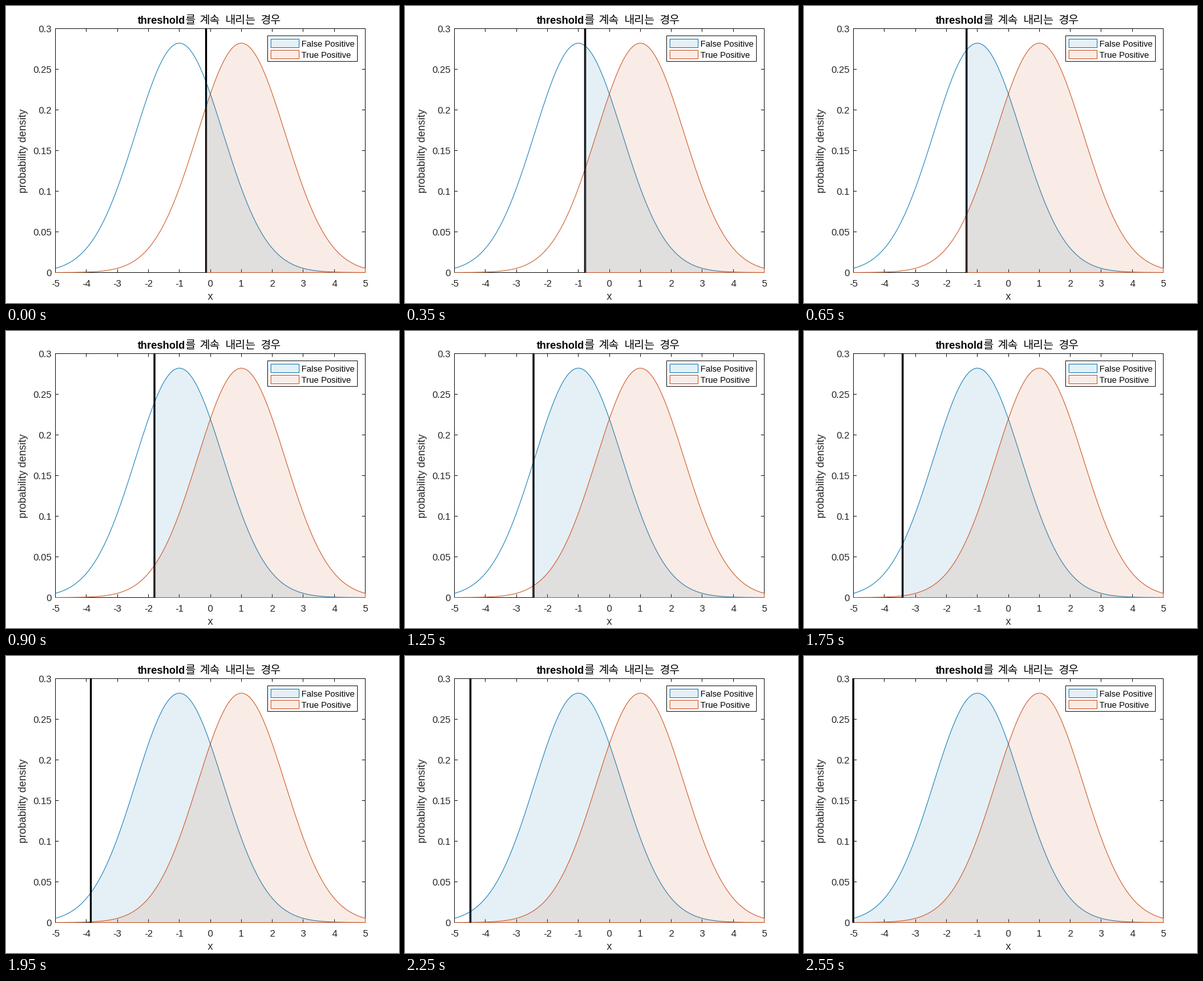
These frames come from a looping animation (600 px wide and 453 px high, 2850 ms). A matplotlib script:

```python
import numpy as np
import matplotlib.pyplot as plt
from matplotlib.animation import FuncAnimation
from matplotlib.patches import Rectangle

# Coordinates already lie on pixel centres, so keep them as given.
plt.rcParams["path.snap"] = False

W, H, DPI = 600, 453, 64
PT = 72 / DPI  # points per pixel
LEFT, RIGHT, TOP, BOTTOM = 75.5, 548.5, 34.5, 406.5
BLUE, ORANGE, DARK = "#1A80B8", "#CE5A28", "#262626"
FILL_ALPHA = 0.115
SANS, KOREAN = "Liberation Sans", "Noto Sans CJK JP"
STEP_MS, FRAMES = 50, 57

# Times at which the threshold pauses for one step, and where it passes.
PAUSES = {50, 450, 850, 1200, 1600, 2300}
KEY_TIMES = [0, 350, 900, 1250, 1500, 1950, 2550]
KEY_X = [305.5, 275, 226.7, 196.2, 171.7, 129.5, 75.2]


def px(x):
    return LEFT + (x + 5) * (RIGHT - LEFT) / 10


def py(p):
    return BOTTOM - p * (BOTTOM - TOP) / 0.3


def density(x, mean):
    return np.exp(-(x - mean) ** 2 / 4) / np.sqrt(4 * np.pi)


def moves(ms):
    """Number of threshold moves made up to a time."""
    return sum(t not in PAUSES for t in range(STEP_MS, min(ms, 2550) + 1, STEP_MS))


KEY_MOVES = [moves(t) for t in KEY_TIMES]


def threshold(frame):
    return np.interp(moves(frame * STEP_MS), KEY_MOVES, KEY_X)


fig = plt.figure(figsize=(W / DPI, H / DPI), dpi=DPI, facecolor="white")
ax = fig.add_axes([0, 0, 1, 1])
ax.set_xlim(0, W)
ax.set_ylim(H, 0)
ax.axis("off")


def line(xs, ys, color=DARK, width=1.0, z=2, **kw):
    return ax.plot(xs, ys, color=color, lw=width * PT, zorder=z,
                   solid_capstyle="butt", **kw)[0]


def label(x, y, s, size, ha="center", font=SANS, color=DARK, va="baseline", **kw):
    return ax.text(x, y, s, fontsize=size * PT, ha=ha, va=va, family=font,
                   color=color, zorder=12, **kw)


def box(x0, y0, x1, y1, z, **kw):
    ax.add_patch(Rectangle((x0, y0), x1 - x0, y1 - y0, lw=PT, zorder=z, **kw))


def draw_axes():
    box(LEFT, TOP, RIGHT, BOTTOM, 2, fc="none", ec=DARK)
    for v in range(-5, 6):
        x = round(px(v) - 0.5) + 0.5
        line([x, x], [BOTTOM, BOTTOM - 5])
        line([x, x], [TOP, TOP + 5])
        label(px(v), 428, str(v), 14.6)
    for k in range(7):
        y = py(0.05 * k)
        line([LEFT, LEFT + 5], [y, y])
        line([RIGHT, RIGHT - 5], [y, y])
        label(69.5, y + 5.5, f"{0.05 * k:.2g}", 14.6, ha="right")
    label(312, 448, "x", 16)
    label(27, 221, "probability density", 16, rotation=90, va="center")


def draw_title():
    label(201, 27, "threshold", 16, ha="left", color="black", weight="bold")
    for x, word in [(273, "를"), (295.5, "계속"), (334.5, "내리는"), (389, "경우")]:
        label(x, 27, word, 17, ha="left", font=KOREAN, color="black")


def draw_legend():
    box(399.5, 45.5, 536.5, 84.5, 10, fc="white", ec=DARK)
    for y, color, name in [(50.5, BLUE, "False Positive"), (67.5, ORANGE, "True Positive")]:
        box(404.5, y, 447.5, y + 13, 11, fc=color, ec="none", alpha=FILL_ALPHA)
        box(404.5, y, 447.5, y + 13, 11, fc="none", ec=color)
        label(451, y + 11.5, name, 13, ha="left", color="black")


class Area:
    """A bell curve whose part right of the threshold is filled."""

    def __init__(self, mean, color, z):
        self.mean = mean
        self.xs = np.linspace(-5, 5, 401)
        line(px(self.xs), py(density(self.xs, mean)), color, z=z + 0.5)
        self.fill = ax.fill([0], [0], fc=color, ec="none", alpha=FILL_ALPHA, zorder=z)[0]
        self.base = line([], [], color, z=z + 0.5)
        self.side = line([], [], color, z=7 + z / 10, alpha=0.45)

    def update(self, x):
        start = max((x - LEFT) / (RIGHT - LEFT) * 10 - 5, -5)
        xs = np.r_[start, self.xs[self.xs > start]]
        pts = np.c_[px(xs), py(density(xs, self.mean))]
        self.fill.set_xy(np.vstack([[px(start), BOTTOM], pts, [RIGHT, BOTTOM]]))
        self.base.set_data([px(start), RIGHT, RIGHT], [BOTTOM, BOTTOM, pts[-1, 1]])
        edge = px(start) + 0.5
        self.side.set_data([edge, edge], [BOTTOM, pts[0, 1]])


draw_axes()
draw_title()
draw_legend()
areas = [Area(-1, BLUE, 3), Area(1, ORANGE, 4)]
bar = line([], [], "black", 3, z=6)


def update(frame):
    x = threshold(frame)
    bar.set_data([x, x], [TOP - 0.5, BOTTOM + 0.5])
    for area in areas:
        area.update(x)
    return []


anim = FuncAnimation(fig, update, frames=FRAMES, interval=STEP_MS,
                     repeat=True, repeat_delay=0, blit=False)
plt.show()
```
